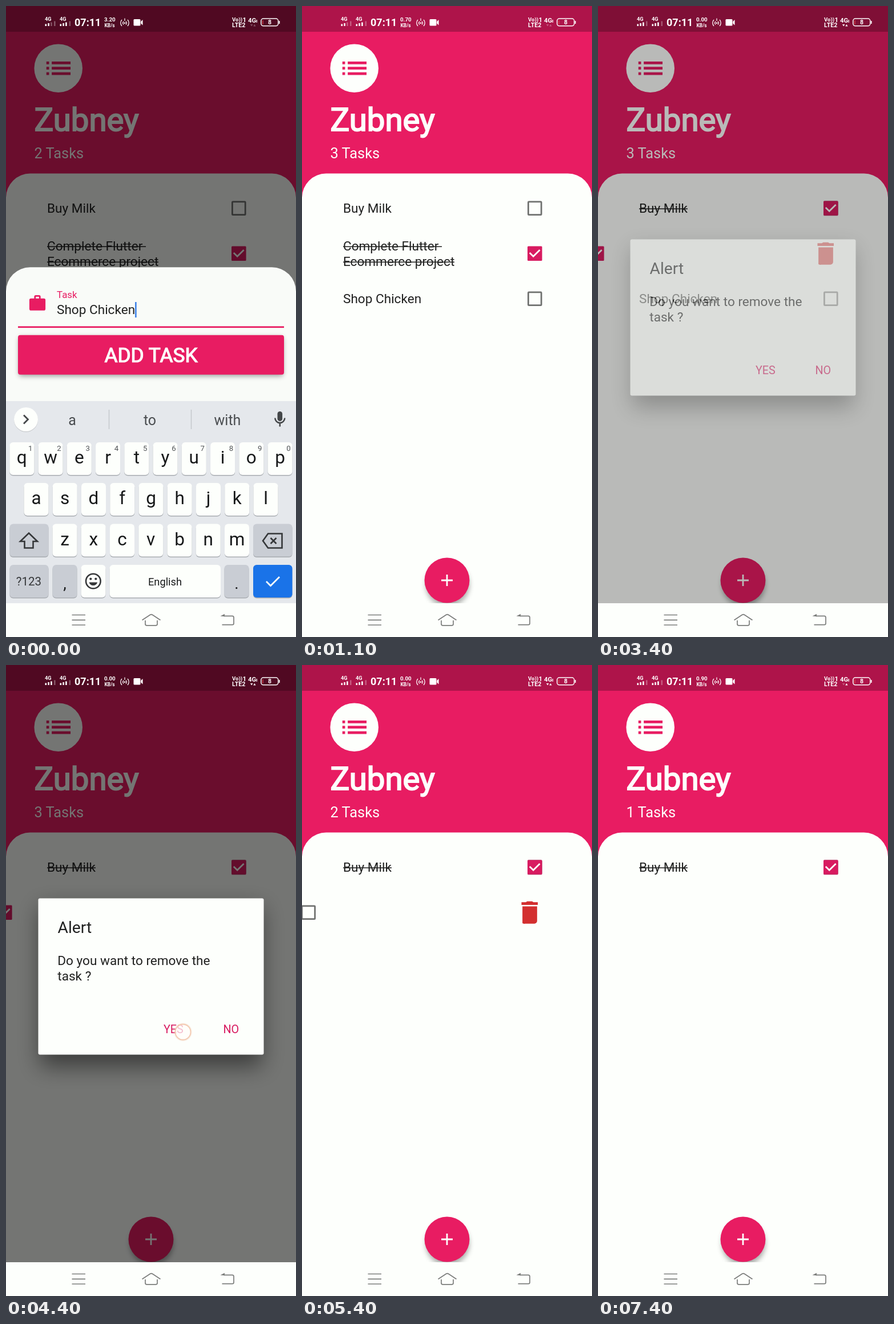
These frames come from a looping animation (508 by 1102 pixels, 8100 ms). An HTML page:

```html
<!DOCTYPE html>
<html lang="en">
<head>
<meta charset="utf-8">
<title>Task list</title>
<style>
html, body { margin: 0; width: 100%; height: 100%; overflow: hidden; background: #fdfffc; }
svg { display: block; width: 508px; height: 1102px; font-family: Roboto, sans-serif; }
text { white-space: pre; }
.body { font-size: 22.58px; fill: #202120; }
.count { font-size: 25.4px; fill: #fdfffc; }
.mid { text-anchor: middle; }
.bold { font-weight: 700; }
.pink { fill: #e81c62; }
.accent { fill: #d81b60; }
.paper { fill: #fdfffc; }
.line { fill: none; stroke-linecap: butt; }
.tick { fill: none; stroke: #fdfffc; stroke-width: 2.8; }
.strike { stroke: #202120; stroke-width: 1.5; }

/* The clock below moves every paused animation */
.run, .hard { animation: 8100ms linear infinite paused; }
.hard { animation-timing-function: step-end; }

#scrim { animation-name: scrim; }
@keyframes scrim {
  0%, 2.46% { opacity: 1 } 7.4%, 40.74% { opacity: 0 } 43.2%, 54.33% { opacity: 1 }
  56.79%, 66.67% { opacity: 0 } 70.37%, 77.77% { opacity: 1 } 79.01% { opacity: .985 }
  81.48%, 100% { opacity: 0 }
}
#dialog { animation-name: dialog; }
@keyframes dialog {
  0%, 40.74% { opacity: 0 } 43.2%, 54.33% { opacity: 1 } 56.79%, 66.67% { opacity: 0 }
  70.37%, 77.77% { opacity: 1 } 79.01% { opacity: .972 } 81.48%, 100% { opacity: 0 }
}
#sheet { animation-name: sheet; }
@keyframes sheet {
  0%, 2.46% { transform: none; animation-timing-function: ease-in-out }
  7.4%, 100% { transform: translateY(650px) }
}
#keyboard { animation-name: keyboard; }
@keyframes keyboard {
  0%, 2.46% { transform: none; animation-timing-function: ease-in }
  6.17%, 100% { transform: translateY(415px) }
}
#row2 { animation-name: swipe2; }
@keyframes swipe2 {
  0%, 37.04% { transform: none; animation-timing-function: ease-in-out }
  40.74%, 56.79% { transform: translateX(-410px) }
  58.02%, 100% { transform: translateX(-520px) }
}
#row3 { animation-name: swipe3; }
@keyframes swipe3 {
  0%, 61.73% { transform: none; animation-timing-function: ease-in }
  66.67% { transform: translateX(-397px) }
  67.9%, 100% { transform: translateX(-520px) }
}
#rest { animation-name: rise1; }
@keyframes rise1 { 0%, 58.02% { transform: none } 60.49%, 100% { transform: translateY(-79px) } }
#tail { animation-name: rise2; }
@keyframes rise2 { 0%, 81.48% { transform: none } 83.95%, 100% { transform: translateY(-79px) } }

#fill { animation-name: fill; }
@keyframes fill { 0%, 20.98% { opacity: 0 } 23.45%, 100% { opacity: 1 } }
#draw { stroke-dasharray: 1 2; animation-name: draw; }
@keyframes draw { 0%, 22.22% { stroke-dashoffset: 1.1 } 24.69%, 100% { stroke-dashoffset: 0 } }
#strike1 { animation-name: struck; }
@keyframes struck { 0% { opacity: 0 } 22.22% { opacity: 1 } }
#item3 { animation-name: added; }
@keyframes added { 0% { opacity: 0 } 3.7% { opacity: 1 } }

#n2 { animation-name: two; }
@keyframes two { 0% { opacity: 1 } 3.7% { opacity: 0 } 58.02% { opacity: 1 } 82.71% { opacity: 0 } }
#n3 { animation-name: three; }
@keyframes three { 0% { opacity: 0 } 3.7% { opacity: 1 } 58.02% { opacity: 0 } }
#n1 { animation-name: one; }
@keyframes one { 0% { opacity: 0 } 82.71% { opacity: 1 } }

#v1 { animation-name: speed1; }
@keyframes speed1 { 0% { opacity: 1 } 4.93% { opacity: 0 } }
#v2 { animation-name: speed2; }
@keyframes speed2 { 0% { opacity: 0 } 4.93% { opacity: 1 } 41.97% { opacity: 0 } }
#v3 { animation-name: speed3; }
@keyframes speed3 { 0% { opacity: 0 } 41.97% { opacity: 1 } 82.71% { opacity: 0 } }
#v4 { animation-name: speed4; }
@keyframes speed4 { 0% { opacity: 0 } 82.71% { opacity: 1 } }
#bar3, #up { animation-name: signal; }
@keyframes signal { 0% { opacity: .3 } 41.97% { opacity: 1 } }
#down { animation-name: down; }
@keyframes down { 0% { opacity: .3 } 41.97% { opacity: 1 } 91.35% { opacity: .3 } }

#tap { opacity: 0; animation-name: tap; }
@keyframes tap {
  0% { opacity: 0; transform: translate(310px, 641px) } 53.08% { opacity: 1; transform: translate(310px, 641px) }
  56.79% { opacity: 0; transform: translate(307px, 633px) } 76.54% { opacity: 1; transform: translate(307px, 633px) }
  80.24%, 100% { opacity: 0; transform: translate(307px, 633px) }
}
#ripple { animation-name: ripple; }
@keyframes ripple {
  0%, 54.33% { opacity: 0; transform: translate(307px, 633px) scale(.2) }
  56.79% { opacity: .12; transform: translate(307px, 633px) scale(1) }
  56.8%, 76.54% { opacity: 0; transform: translate(307px, 633px) scale(.2) }
  79.01%, 81.48% { opacity: .12; transform: translate(307px, 633px) scale(1) }
  81.5%, 100% { opacity: 0; transform: translate(307px, 633px) scale(.2) }
}
</style>
</head>
<body>
<svg viewBox="0 0 508 1102">
  <defs>
    <filter id="soft" x="-30%" y="-30%" width="160%" height="170%"><feGaussianBlur stdDeviation="5"/></filter>
    <filter id="deep" x="-30%" y="-30%" width="160%" height="170%"><feGaussianBlur stdDeviation="19"/></filter>
    <clipPath id="press"><rect x="260" y="610" width="92" height="50"/></clipPath>
    <rect id="box" x="396.4" y="1.4" width="22.8" height="22.8" rx="1" fill="none" stroke="#707270" stroke-width="2.8"/>
    <rect id="full" x="395" width="25.6" height="25.6" rx="1.5" class="accent"/>
    <path id="tick" d="M398.8 11.4L405.2 17.8L416.6 6.4" pathLength="1"/>
  </defs>

  <!-- Header -->
  <rect width="508" height="400" class="pink"/>
  <rect width="508" height="45" fill="#ae144a"/>
  <circle cx="91.7" cy="108.7" r="42.3" class="paper"/>
  <path class="pink" transform="translate(63.7 80.5) scale(2.35)" d="M3 7h2v2H3zM3 11h2v2H3zM3 15h2v2H3zM7 7h14v2H7zM7 11h14v2H7zM7 15h14v2H7z"/>
  <text x="49.4" y="218" font-size="56.4" class="paper" stroke="#fdfffc" stroke-width="1.9">Zubney</text>
  <text x="49.4" y="266" class="count hard" id="n2">2 Tasks</text>
  <text x="49.4" y="266" class="count hard" id="n3">3 Tasks</text>
  <text x="49.4" y="266" class="count hard" id="n1">1 Tasks</text>

  <!-- List -->
  <path class="paper" d="M0 1102V334.8A42.3 42.3 0 0 1 42.3 292.5H465.7A42.3 42.3 0 0 1 508 334.8V1102z"/>
  <text x="72" y="361" class="body">Buy Milk</text>
  <path id="strike1" class="strike hard" d="M72 354.2H157"/>
  <g transform="translate(0 340.5)">
    <use href="#box"/>
    <use href="#full" id="fill" class="run"/>
    <use href="#tick" id="draw" class="tick run"/>
  </g>
  <path fill="#d32f2f" transform="translate(370.2 404.3) scale(2.38)" d="M7 19.7h-.2a2 2 0 0 1-.1-1.1V7.2h10.8v10.7a2 2 0 0 1-2 2H8.6a2 2 0 0 1-1.6-.2zM6 6.4zM18 4.2v2H6v-2h3.2l1-.6h3.6l1 .6z"/>
  <g id="rest" class="run">
    <g id="row3" class="run">
      <rect y="472" width="508" height="79" class="paper"/>
      <g id="item3" class="hard">
        <text x="72" y="519" class="body">Shop Chicken</text>
        <use href="#box" y="498.5"/>
      </g>
    </g>
    <rect id="tail" class="paper run" y="551" width="508" height="79"/>
  </g>
  <g id="row2" class="run">
    <rect y="393" width="508" height="79" class="paper"/>
    <text x="72" y="427" class="body">Complete Flutter </text>
    <text x="72" y="454" class="body">Ecommerce project</text>
    <path class="strike" d="M72 420.2H245M72 447.2H267"/>
    <use href="#full" y="419.5"/>
    <use href="#tick" y="419.5" class="tick"/>
  </g>
  <circle cx="255" cy="1011" r="38" fill="#000" opacity=".34" filter="url(#soft)"/>
  <circle cx="254" cy="1003" r="39.5" class="pink"/>
  <path d="M244 1003H264M254 993V1013" stroke="#fdfffc" stroke-width="2.8"/>

  <rect id="scrim" class="run" width="508" height="1043" fill-opacity=".54"/>

  <!-- New task sheet -->
  <g id="sheet" class="run">
    <path fill="#f9fbf8" d="M0 1102V498.5A42.3 42.3 0 0 1 42.3 456.2H465.7A42.3 42.3 0 0 1 508 498.5V1102z"/>
    <path class="pink" transform="translate(38.1 502.2) scale(1.41)" d="M20 6h-4V4a2 2 0 0 0-2-2h-4a2 2 0 0 0-2 2v2H4a2 2 0 0 0-2 2v11a2 2 0 0 0 2 2h16a2 2 0 0 0 2-2V8a2 2 0 0 0-2-2zm-6 0h-4V4h4z"/>
    <text x="89" y="510" font-size="16.9" class="pink">Task</text>
    <text x="89" y="538" class="body">Shop Chicken</text>
    <rect x="226" y="517" width="2.7" height="27" fill="#4285e8"/>
    <rect x="21" y="559.3" width="466" height="2.8" class="pink"/>
    <rect x="23" y="579" width="462" height="67" rx="3" opacity=".4" filter="url(#soft)"/>
    <rect x="21" y="574.8" width="466" height="69" rx="4" class="pink"/>
    <text x="254" y="622" font-size="35.3" class="paper mid" stroke="#fdfffc" stroke-width="1.2">ADD TASK</text>
  </g>

  <!-- Keyboard -->
  <g id="keyboard" class="run">
    <rect y="690" width="508" height="354" fill="#e5e8ec"/>
    <circle cx="35" cy="723" r="21" fill="#000" opacity=".16"/>
    <circle cx="35" cy="722" r="21" class="paper"/>
    <path d="M31 714.5L38.5 722L31 729.5" class="line" stroke="#444749" stroke-width="2.8"/>
    <path d="M180.5 705V739M324.5 705V739" stroke="#c3c7cb" stroke-width="1.4"/>
    <g font-size="25" fill="#4a4d50" class="mid">
      <text x="116" y="732">a</text><text x="252" y="732">to</text><text x="388" y="732">with</text>
    </g>
    <rect x="475.5" y="708" width="8.6" height="17" rx="4.3" fill="#444749"/>
    <path d="M471.3 719.5a8.5 8.5 0 0 0 17 0M479.8 728V734.5" class="line" stroke="#444749" stroke-width="2.5"/>
    <g id="keys" class="mid"></g>
    <path d="M40 920.5L55 935H47.5V946.5H32.5V935H25z" class="line" stroke="#353739" stroke-width="2.6"/>
    <path d="M459 921.5H483.5V946.5H459L450 934zM463.5 929L473.5 939M473.5 929L463.5 939" class="line" stroke="#353739" stroke-width="2.6"/>
    <circle cx="152.8" cy="1004.5" r="12.8" class="line" stroke="#353739" stroke-width="2.6"/>
    <circle cx="148.3" cy="1000.5" r="2.1" fill="#353739"/><circle cx="157.3" cy="1000.5" r="2.1" fill="#353739"/>
    <path d="M145.5 1006.5H160.1A7.6 7.6 0 0 1 145.5 1006.5z" fill="#353739"/>
    <path d="M456 1005L463.5 1012.5L479 997" class="tick"/>
  </g>

  <!-- Alert -->
  <g id="dialog" class="run">
    <rect x="60" y="424" width="388" height="277" opacity=".48" filter="url(#deep)"/>
    <rect x="56.5" y="407.5" width="395" height="273" rx="3" class="paper"/>
    <text x="90.5" y="468" font-size="28.2" fill="#202120">Alert</text>
    <text x="90.3" y="524" class="body">Do you want to remove the</text>
    <text x="90.3" y="550.5" class="body">task ?</text>
    <g clip-path="url(#press)"><circle id="ripple" class="accent run" r="28"/></g>
    <g font-size="19.75" class="accent">
      <text x="276" y="642.5">YES</text><text x="380.5" y="642.5">NO</text>
    </g>
  </g>
  <g id="tap" class="hard">
    <circle r="13.5" fill="#fffdfa" fill-opacity=".72" stroke="#f3c9b0" stroke-width="1.8"/>
    <circle r="15" fill="none" stroke="#f3c9b0" stroke-opacity=".3" stroke-width="1.5"/>
  </g>

  <!-- Status bar -->
  <g fill="#fff" class="bold">
    <g font-size="9.2"><text x="68" y="26">4G</text><text x="94" y="26">4G</text></g>
    <path d="M68.5 31.5h2.6V35h-2.6zM73.3 30h2.6v5h-2.6zM94.5 31.5h2.6V35h-2.6zM99.3 30h2.6v5h-2.6zM104.1 28.5h2.6V35h-2.6z"/>
    <path id="bar3" class="hard" d="M78.1 28.5h2.6V35h-2.6z"/>
    <path opacity=".3" d="M84 26.5h2.6V35H84zM110.5 26.5h2.6V35h-2.6z"/>
    <text x="120" y="35.3" font-size="18">07:11</text>
    <g font-size="9.8">
      <text x="172" y="27.2" class="hard" id="v1">3.20</text>
      <text x="172" y="27.2" class="hard" id="v2">0.70</text>
      <text x="172" y="27.2" class="hard" id="v3">0.00</text>
      <text x="172" y="27.2" class="hard" id="v4">0.90</text>
    </g>
    <text x="172.5" y="36.8" font-size="8.4">KB/s</text>
    <path d="M203 24a8 8 0 0 0 0 11M213 24a8 8 0 0 1 0 11M206 27a4 4 0 0 0 0 5.5M210 27a4 4 0 0 1 0 5.5" class="line" stroke="#fff" stroke-width="1.3"/>
    <circle cx="208" cy="29.7" r="1.3"/><path d="M207.4 21.5h1.2v4.5h-1.2z"/>
    <rect x="223.5" y="23" width="12" height="11.5" rx="1.5"/><path d="M236.3 27L239.5 24V33.5L236.3 30.5z"/>
    <text x="396" y="27" font-size="9.6">Vo))</text><text x="414.5" y="28" font-size="11.5">1</text>
    <text x="396" y="37" font-size="10.6">LTE2</text>
    <text x="424" y="29" font-size="11.3">4G</text><path d="M438.6 24h1.3v5h-1.3z"/>
    <path id="down" class="hard" d="M428 32h4.4l-2.2 3.6z"/>
    <path id="up" class="hard" d="M433.2 35.6h4.4l-2.2-3.6z"/>
    <rect x="446.8" y="22" width="30" height="12.8" rx="4" fill="none" stroke="#fff" stroke-width="1.5"/>
    <path d="M478 26h1.6v5H478z"/><path fill="#e2474c" d="M449.2 25h1.3v7h-1.3z"/>
    <text x="462" y="32.2" font-size="10.5" class="mid">8</text>
  </g>

  <!-- Navigation bar -->
  <rect y="1043" width="508" height="59" class="paper"/>
  <g class="line" stroke="#7b7d7b" stroke-width="1.7">
    <path d="M115.5 1063.5H139M115.5 1072.3H139M115.5 1081H139"/>
    <path d="M238.5 1072.5L252.5 1063.2Q254.5 1062 256.5 1063.2L270.5 1072.5M244 1073V1079.5Q244 1081.8 246.5 1081.8H262.5Q265 1081.8 265 1079.5V1073"/>
    <path d="M382 1065.3H396.5Q399 1065.3 399 1068V1078Q399 1080.7 396.5 1080.7H378.5"/>
    <path d="M375.5 1065.6L383 1061.8V1066.2z" fill="#7b7d7b" stroke="none"/>
  </g>
</svg>
<script>
const LOOP = 8100, STEP = 100, PITCH = 50.25;

const key = (x, y, w, fill = '#fdfffc') =>
  `<rect x="${x}" y="${y + 1.6}" width="${w}" height="57" rx="6" fill="#a9adb2"/>` +
  `<rect x="${x}" y="${y}" width="${w}" height="57" rx="6" fill="${fill}"/>`;
const label = (x, y, size, str, fill = '#17191a') =>
  `<text x="${x}" y="${y}" font-size="${size}" fill="${fill}">${str}</text>`;
const row = (str, x, y, hints) => [...str].map((c, i) => {
  const cx = x + i * PITCH;
  return key(cx - 21.5, y, 43) + label(cx, y + 37.3, 31.5, c) +
    (hints ? label(cx + 15, y + 15, 13.2, (i + 1) % 10, '#505356') : '');
}).join('');

const grey = '#c9cdd4';
document.getElementById('keys').innerHTML =
  row('qwertyuiop', 27.8, 762, true) + row('asdfghjkl', 53, 833) + row('zxcvbnm', 103, 904.5) +
  key(6.5, 904.5, 68, grey) + key(433, 904.5, 68.5, grey) +
  key(6.5, 976, 68, grey) + key(81.5, 976, 43, grey) + key(131.5, 976, 43) +
  key(181.5, 976, 194.5) + key(382.5, 976, 43, grey) + key(433, 976, 68.5, '#1a73e8') +
  label(40, 1012, 20.5, '?123', '#353739') + label(103, 1018, 28, ',') +
  label(278.5, 1011.5, 18.3, 'English') + label(404, 1018, 28, '.');

const start = performance.now();
function tick() {
  const t = Math.floor((performance.now() - start) % LOOP / STEP) * STEP;
  for (const a of document.getAnimations()) a.currentTime = t;
  requestAnimationFrame(tick);
}
tick();
</script>
</body>
</html>
```
